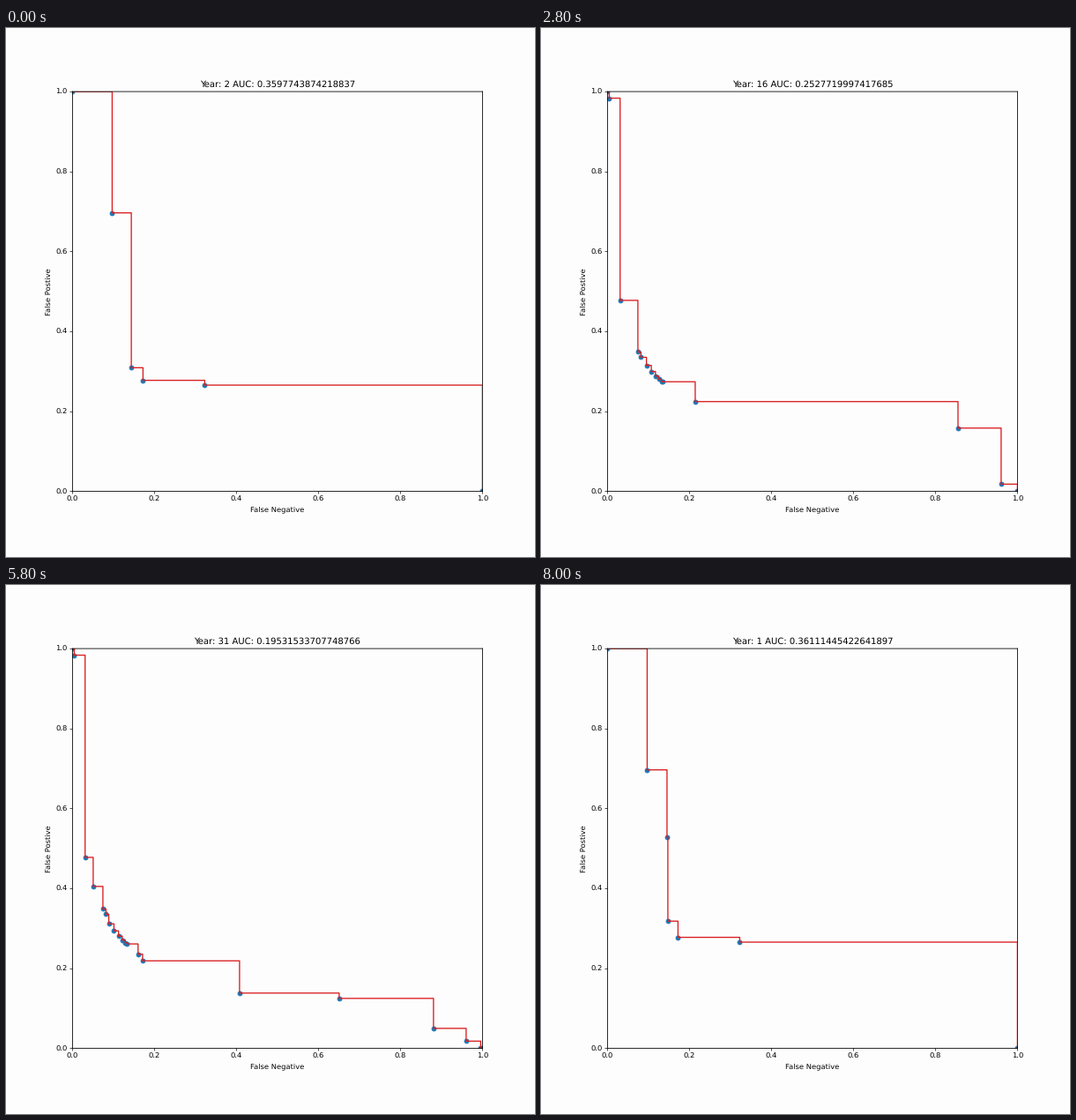
A matplotlib script that plays this animation: 600x600 px, repeating every 8200 ms.

```python
import numpy as np
import matplotlib.pyplot as plt
from matplotlib.animation import FuncAnimation

SIZE = 600
YEARS = 41
PAPER = "#fefdfe"
RED = "#d81e20"

# Large corners of the front: (year, false negative, false positive).
CORNERS = [
    (1, .0968, .6965), (1, .1452, .5276), (1, .1473, .318), (1, .172, .2775),
    (1, .3226, .2655), (2, .1435, .309), (5, .214, .2243), (6, .0935, .393),
    (7, .0363, .711), (12, .0043, .9835), (13, .9602, .0177), (15, .855, .158),
    (18, .9957, .0002), (26, .4075, .138), (27, .8806, .0497),
    (30, .171, .2187), (31, .6505, .1247),
]
# Corners that lie on the trade-off curve: (year, false negative).
ON_CURVE = [(13, .0742), (14, .0308), (24, .16), (29, .0505), (33, .0145)]


def trade_off(x):
    return -.147 * np.log(x) - .034


def search():
    """All candidates found over the years, as rows of (year, x, y)."""
    found = CORNERS + [(year, x, trade_off(x)) for year, x in ON_CURVE]
    # The knee is swept from right to left twice, a little lower every year.
    for year in range(3, 28, 2):
        u = (year - 3) / 13 % 1
        x = .1345 - .06 * u ** 1.6
        found.append((year, x, trade_off(x) + .001 * (16 - year)))
    found = np.array(found)
    found[:, 1:] += np.random.default_rng(2).normal(0, 1e-6, (len(found), 2))
    return found


FOUND = search()


def front(year):
    """Non-dominated candidates known by the given year, with both end points."""
    known = FOUND[FOUND[:, 0] <= year, 1:]
    best = [(0.0, 1.0)]
    for x, y in sorted(known.tolist()):
        if y < best[-1][1]:
            best.append((x, y))
    return np.array(best + [(1.0, 0.0)])


plt.rcParams["text.hinting"] = "no_hinting"
fig = plt.figure(figsize=(10, 10), dpi=SIZE / 10, facecolor=PAPER)
left, right, top, bottom = 75.4, 540.4, 72.1, 525.4
ax = fig.add_axes([left / SIZE, 1 - bottom / SIZE,
                   (right - left) / SIZE, (bottom - top) / SIZE], facecolor=PAPER)
ax.set(xlim=(0, 1), ylim=(0, 1), xlabel="False Negative", ylabel="False Postive")
for spine in ax.spines.values():
    spine.set(linewidth=1, snap=False)

title = ax.set_title("")
dots = ax.scatter([], [], color="C0", snap=False)
line, = ax.plot([], [], color=RED, lw=1.6, drawstyle="steps-post", snap=False)


def draw(i):
    year = (i + 1) % YEARS + 1
    pts = front(year)
    x, y = pts.T
    auc = float(np.sum(np.diff(x) * y[:-1]))
    dots.set_offsets(pts)
    line.set_data(x, y)
    title.set_text(f"Year: {year} AUC: {auc}")
    return dots, line, title


anim = FuncAnimation(fig, draw, frames=YEARS, interval=200, repeat=True,
                     repeat_delay=0, blit=False)
plt.show()
```
